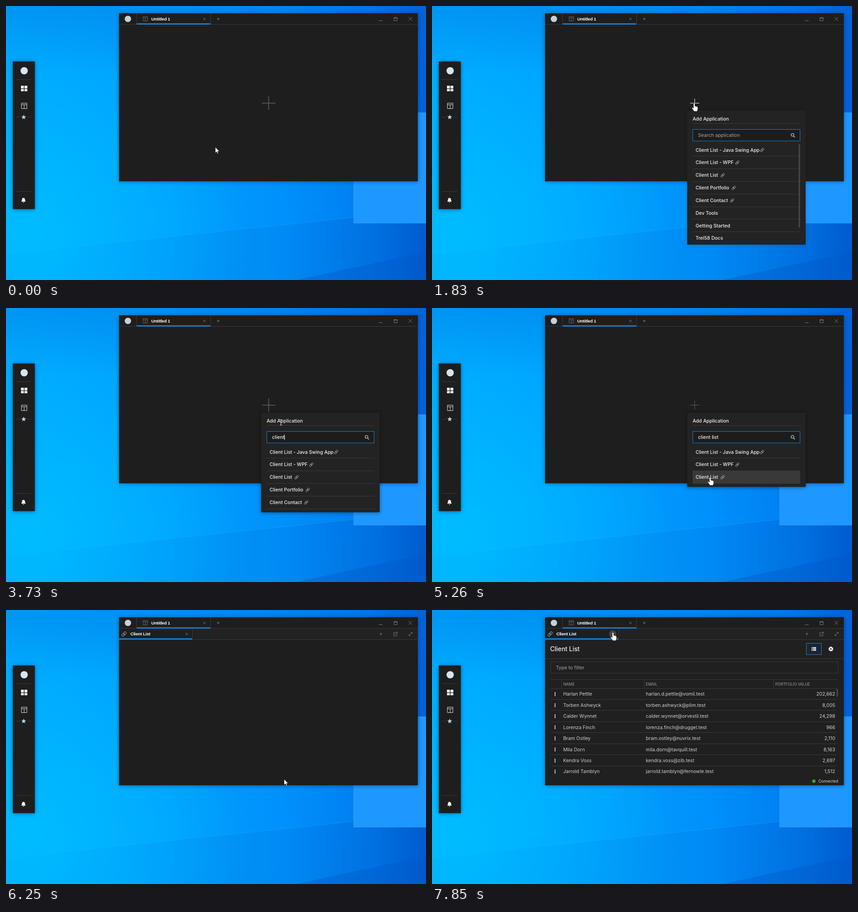
An HTML page that plays this animation: 925 px wide and 605 px high, repeating every 8000 ms.

```html
<!DOCTYPE html>
<html lang="en">
<head>
<meta charset="utf-8">
<title>Add application</title>
<style>
  html, body { margin: 0; width: 100%; height: 100%; overflow: hidden; background: #009cff; }
  svg { display: block; width: 925px; height: 605px; }
  text { font: 500 10.5px Inter, "Open Sans", sans-serif; fill: #f2f2f2; white-space: pre; }
  .tab { font: bold 9.5px "Liberation Sans", Arial, sans-serif; letter-spacing: -.2px; fill: #fff; }
  .title { font-size: 13.8px; }
  .head { font-size: 8.4px; font-weight: 400; fill: #a0a0a0; }
  .cell { font-weight: 400; fill: #d0d0d0; }
  .note { font-size: 8.4px; font-weight: 400; fill: #ddd; }
  .soft { font-weight: 400; fill: #a6a6a6; }
  .line { stroke: #3a3a3a; fill: none; }
  .dim { stroke: #777; fill: none; }
  .accent { fill: #1c82d6; }
  .win { filter: drop-shadow(0 1px 4px rgba(0, 20, 60, .5)); }
</style>
</head>
<body>
<svg viewBox="0 0 925 605" xmlns="http://www.w3.org/2000/svg">
  <defs>
    <linearGradient id="sky" gradientUnits="userSpaceOnUse" x1="0" y1="300" x2="925" y2="250">
      <stop offset="0" stop-color="#00a8ff"/>
      <stop offset=".35" stop-color="#00a0ff"/>
      <stop offset=".65" stop-color="#0091fb"/>
      <stop offset=".87" stop-color="#007cf0"/>
      <stop offset="1" stop-color="#0062da"/>
    </linearGradient>
    <radialGradient id="glow" gradientUnits="userSpaceOnUse" cx="50" cy="500" r="480">
      <stop offset="0" stop-color="#00bcff"/>
      <stop offset="1" stop-color="#00bcff" stop-opacity="0"/>
    </radialGradient>
    <linearGradient id="shade" x1="0" y1="0" x2="0" y2="1">
      <stop offset="0" stop-color="#0068d0" stop-opacity=".28"/>
      <stop offset="1" stop-color="#0068d0" stop-opacity="0"/>
    </linearGradient>
    <linearGradient id="floor" gradientUnits="userSpaceOnUse" x1="100" y1="520" x2="925" y2="605">
      <stop offset="0" stop-color="#0078e0" stop-opacity=".03"/>
      <stop offset=".6" stop-color="#0078e0" stop-opacity=".25"/>
      <stop offset="1" stop-color="#0050c0" stop-opacity=".5"/>
    </linearGradient>
    <g id="link" fill="none" stroke="#bbb" stroke-width=".9">
      <rect x="-4.8" y="-1.9" width="5.8" height="3.8" rx="1.9" transform="rotate(-45)"/>
      <rect x="-1" y="-1.9" width="5.8" height="3.8" rx="1.9" transform="rotate(-45)"/>
    </g>
    <path id="cross" d="M-2.5-2.5l5 5m0-5l-5 5"/>
    <path id="add" d="M-3 0h6M0-3v6"/>
    <path id="pane" d="M.5.5h12v12H.5zM.5 4h12M6.5 4v8.5"/>
  </defs>

  <rect width="925" height="605" fill="url(#sky)"/>
  <rect width="925" height="605" fill="url(#glow)"/>
  <rect width="925" height="150" fill="url(#shade)"/>
  <path d="M0 547L764 467 925 444V605H0z" fill="url(#floor)"/>
  <path d="M0 547L764 467" stroke="#35b6ff" stroke-opacity=".3"/>
  <path d="M640 605L925 543V605z" fill="#0058c4" opacity=".35"/>
  <rect x="765" y="235" width="245" height="245" fill="#1e98ff"/>

  <g id="dock">
    <rect class="win" x="15" y="122.500" width="48.500" height="326" fill="#1e1e1e"/>
    <circle cx="40" cy="143" r="8" fill="#d6e6f0"/>
    <path class="line" d="M22 162.500h34M22 245.500h10M47 245.500h9M22 409.500h34"/>
    <path d="M33 176h6.300v6H33zM40.700 176H47v6h-6.300zM33 183.300h6.300v5H33zM40.700 183.300H47v5h-6.300z" fill="#eef4f8"/>
    <use href="#pane" x="33.500" y="214" stroke="#dce6ec" fill="none"/>
    <path d="M39 240l1.500 3.400 3.700.4-2.800 2.500.8 3.700-3.200-1.900-3.200 1.900.8-3.700-2.800-2.500 3.700-.4z" fill="#bcd3e2"/>
    <path d="M33.500 432q1.600-1.500 1.600-4.500 0-3.500 3.400-4 3.400.5 3.400 4 0 3 1.600 4.500zM37 433h3q-.2 1.400-1.500 1.400T37 433z" fill="#f0f0f0"/>
  </g>

  <rect class="win" x="249" y="16" width="658" height="371" fill="#1e1e1e"/>
  <circle cx="268.500" cy="28.500" r="7" fill="#c2d2dd"/>
  <path class="line" d="M249 40.500h658M287.500 16v24M450.500 16v24"/>
  <rect class="accent" x="288" y="38.300" width="162" height="2.700"/>
  <use href="#pane" transform="translate(301.500 23) scale(.8)" class="dim"/>
  <text class="tab" x="320" y="31.700">Untitled 1</text>
  <use href="#cross" x="437" y="28.500" class="dim"/>
  <use href="#add" x="467.500" y="28.500" class="dim"/>
  <path class="dim" d="M821 32.500h8.500M854.500 25.500h7v7h-7zM854.500 27h7M886.500 24.500l8 8m0-8l-8 8"/>

  <path id="plus" d="M-10 0h20M0-10v20"/>

  <g id="app">
    <rect x="249" y="41" width="658" height="24" fill="#222"/>
    <path class="line" d="M249 65.500h658M410.500 41v24"/>
    <rect x="249" y="41" width="161" height="24" fill="#1e1e1e"/>
    <rect class="accent" x="249" y="62.500" width="161" height="2.700"/>
    <use href="#link" transform="translate(260 53) scale(1.25)" opacity=".7"/>
    <text class="tab" x="274" y="56.200">Client List</text>
    <circle id="closeHover" cx="398" cy="53" r="8" fill="#444"/>
    <use href="#cross" x="398" y="53" class="dim"/>
    <use href="#add" x="825.500" y="53" class="dim"/>
    <path class="dim" d="M858 50h-4v7h7v-3.500M857 54l5-5m-3.500 0h3.500v3.500M887.500 56.500l7-7m-3 0h3v3m-7 1v3h3"/>
  </g>

  <g id="page">
    <rect x="249" y="66" width="658" height="321" fill="#202020"/>
    <path class="line" d="M249 107.500h658M261 153.500h632M261 173.500h632M285.500 153v20M467.500 153v20M752.500 153v20"/>
    <text class="title" x="260" y="91">Client List</text>
    <rect class="line" x="261.500" y="114.500" width="633" height="25"/>
    <text class="soft" x="273" y="131.200">Type to filter</text>
    <text class="head" x="289.500" y="166.500">NAME</text>
    <text class="head" x="471" y="166.500">EMAIL</text>
    <text class="head" x="756" y="166.500">PORTFOLIO VALUE</text>
  </g>
  <g id="table"></g>
  <g id="tools">
    <rect x="824.500" y="73.500" width="33" height="25" fill="#1b2530" stroke="#2a80d0"/>
    <path d="M836 82h2v2h-2zM839 82h7v2h-7zM836 85h2v2h-2zM839 85h7v2h-7zM836 88h2v2h-2zM839 88h7v2h-7z" fill="#fff"/>
    <circle cx="878.500" cy="86" r="3" fill="none" stroke="#fff" stroke-width="2.600"/>
    <circle cx="878.500" cy="86" r="4.700" fill="none" stroke="#fff" stroke-width="1.500" stroke-dasharray="1.850 1.840"/>
    <circle cx="841" cy="378" r="3.700" fill="#35a83a"/>
    <text class="note" x="851" y="381">Connected</text>
  </g>

  <g id="popup">
    <rect id="sheet" x="562" y="231" width="261" fill="#232323"/>
    <text x="574" y="252.800">Add Application</text>
    <path class="line" d="M574 259.500h237"/>
    <rect x="574.500" y="272.500" width="236" height="25.500" fill="#1c1c1c" stroke="#1f7ed2"/>
    <text id="query" x="586" y="289.300"></text>
    <path id="caret" d="M0 279.500v12" stroke="#fff"/>
    <path d="M796.500 287.500l2.700 2.700" stroke="#aaa" stroke-width="1.800"/>
    <circle cx="794" cy="284.500" r="3.100" fill="none" stroke="#aaa" stroke-width="1.500"/>
    <g id="list"></g>
    <rect id="bar" x="807.500" y="305" width="3" height="184" fill="#484848"/>
  </g>

  <g id="cursor" fill="#fff" stroke="#111" stroke-width=".7">
    <path id="arrow" d="M0 0V13L3 10.200 5 14.800 7 14 5 9.500H9z"/>
    <path id="hand" d="M-1.600 1.600a1.600 1.600 0 0 1 3.200 0V6.500l4.400 1q2.300.5 2.200 2.700L7.700 14q-.4 2-1.400 4.200H-.3q-1.800-3.200-4.600-6.500-.9-1.800.8-2.100 1.200.1 2.500 1.900z"/>
    <path id="beam" d="M-2.500-6h2L0-5.500.5-6h2M0-5.500v11M-2.500 6h2L0 5.500.5 6h2" fill="none" stroke="#e8e8e8" stroke-width="1"/>
  </g>
</svg>
<script>
const $ = id => document.getElementById(id);
const show = (id, on) => $(id).style.display = on ? '' : 'none';

const LOOP = 8000, OPEN = 1600, CLOSE = 5600, LEAVE = 2260, TAB = 5920;
const PITCH = 27.85, LIST_TOP = 304.3, ROW = 24.45, TABLE_TOP = 173.5;

// Name and x of the link icon (0: none)
const apps = [
  ['Client List - Java Swing App', 727], ['Client List - WPF', 672.5], ['Client List', 640],
  ['Client Portfolio', 664.5], ['Client Contact', 661], ['Dev Tools', 0],
  ['Getting Started', 0], ['Trel58 Docs', 0]
];
const clients = [
  ['Harlan Pettle', 'harlan.d.pettle@vomil.test', '202,662'],
  ['Torben Ashwyck', 'torben.ashwyck@plim.test', '8,005'],
  ['Calder Wynnet', 'calder.wynnet@orvestil.test', '24,298'],
  ['Lorenza Finch', 'lorenza.finch@druggel.test', '966'],
  ['Bram Ostley', 'bram.ostley@nuvrix.test', '2,110'],
  ['Mila Dorn', 'mila.dorn@tavquill.test', '8,163'],
  ['Kendra Voss', 'kendra.voss@zib.test', '2,697'],
  ['Jarrold Tamblyn', 'jarrold.tamblyn@fernowle.test', '1,512']
];

$('list').innerHTML = apps.map(([name, x], i) => {
  const y = LIST_TOP + i * PITCH, end = Math.round(y + PITCH) - .5;
  return `<g><rect x="574" y="${y}" width="237" height="${i < 7 ? PITCH : 24}" fill="#393939"/>
    <text x="580.5" y="${y + 17.2}">${name}</text>
    ${x ? `<use href="#link" x="${x}" y="${y + 13.7}"/>` : ''}
    ${i < 7 ? `<path class="line" d="M574 ${end}h237"/>` : ''}</g>`;
}).join('');

$('table').innerHTML = clients.map(([name, mail, value], i) => {
  const y = TABLE_TOP + i * ROW, mid = y + 12.2;
  return `<g><rect x="261" y="${y + .5}" width="630" height="${ROW - 1}" fill="#303030"/>
    <path d="M271 ${mid - 4}v8" stroke="#fff" stroke-width="2" stroke-dasharray="2 1"/>
    <text class="cell" x="289" y="${mid + 3.6}">${name}</text>
    <text class="cell" x="471" y="${mid + 3.6}">${mail}</text>
    <text class="cell" x="888" y="${mid + 3.6}" text-anchor="end">${value}</text>
    ${i < 7 ? `<path class="line" d="M261 ${Math.round(y + ROW) - .5}h630"/>` : ''}</g>`;
}).join('') + '<rect x="891" y="174" width="3" height="17" fill="#484848"/>';

const appRows = [...$('list').children], clientRows = [...$('table').querySelectorAll('g')];

// Pointer moves: start, end, target x, target y
const moves = [
  [500, 1300, 577.5, 214.5], [2140, 2500, 605.5, 252.5],
  [4570, 5150, 612.5, 373.5], [7190, 7820, 398.5, 49.5]
];
const phrase = 'client list';
const keys = [2960, 3080, 3200, 3320, 3440, 3560, 3860, 4000, 4130, 4260, 4400];

function pointer(t) {
  let x = 461, y = 311.5;
  for (const [from, to, tx, ty] of moves) {
    const k = Math.min(1, Math.max(0, (t - from) / (to - from)));
    const s = k * k * (3 - 2 * k);
    x += (tx - x) * s;
    y += (ty - y) * s;
  }
  return [x, y];
}

function drawPlus(t) {
  const hover = t >= 1200 && t < LEAVE;
  const wave = start => .5 - .5 * Math.cos((t - start) * Math.PI / 300);
  const scale = hover ? 1 : 1 + .5 * wave(t < LEAVE ? 330 : LEAVE);
  show('plus', t < TAB);
  $('plus').setAttribute('transform', `translate(578.5 214.500) scale(${scale})`);
  $('plus').setAttribute('stroke', hover ? '#fff' : '#626262');
  return hover;
}

function drawPopup(t, y) {
  const open = t >= OPEN && t < CLOSE;
  show('popup', open);
  if (!open) return -1;
  const typed = keys.filter(k => k <= t).length;
  const count = typed < 2 ? 8 : typed < 8 ? 5 : 3;
  const over = y >= LIST_TOP ? Math.floor((y - LIST_TOP) / PITCH) : -1;
  const shade = Math.min(1, Math.max(0, Math.ceil((t - 1829) / 60) / 3));

  $('sheet').setAttribute('height', { 8: 296, 5: 220, 3: 164 }[count]);
  $('sheet').style.filter = `drop-shadow(0 1px 4px rgba(0,0,0,${.45 * shade}))`;
  appRows.forEach((row, i) => {
    row.style.display = i < count ? '' : 'none';
    row.firstChild.style.display = i === over ? '' : 'none';
  });
  show('bar', count === 8);

  const query = $('query');
  query.textContent = typed ? phrase.slice(0, typed) : 'Search application';
  query.setAttribute('class', typed ? '' : 'soft');
  const width = typed ? query.getComputedTextLength() : 0;
  const since = t - (typed ? keys[typed - 1] : 1880);
  show('caret', since >= 0 && since % 1000 < 500);
  $('caret').setAttribute('transform', `translate(${Math.round(586 + width) + .5} 0)`);
  return over;
}

function drawApp(t, y) {
  show('app', t >= TAB);
  show('page', t >= 6350);
  show('table', t >= 6550);
  show('tools', t >= 6720);
  const over = Math.floor((y - TABLE_TOP) / ROW);
  clientRows.forEach((row, i) => row.firstChild.style.display = i === over ? '' : 'none');
  const close = t >= TAB && y < 61;
  show('closeHover', close);
  return close;
}

function render(t) {
  const [x, y] = pointer(t);
  const onPlus = drawPlus(t), row = drawPopup(t, y), onClose = drawApp(t, y);
  const inPopup = t >= LEAVE && t < CLOSE;
  const beam = inPopup ? (y > 241 && y < 258) || (y > 272 && y < 298)
                       : t >= 6550 && y > 114 && y < 140;
  const hand = onPlus || row >= 0 || onClose;
  show('hand', hand);
  show('beam', beam && !hand);
  show('arrow', !hand && !beam);
  $('cursor').setAttribute('transform', `translate(${x} ${y})`);
}

const start = performance.now();
(function tick() {
  render((performance.now() - start) % LOOP);
  requestAnimationFrame(tick);
})();
</script>
</body>
</html>
```
